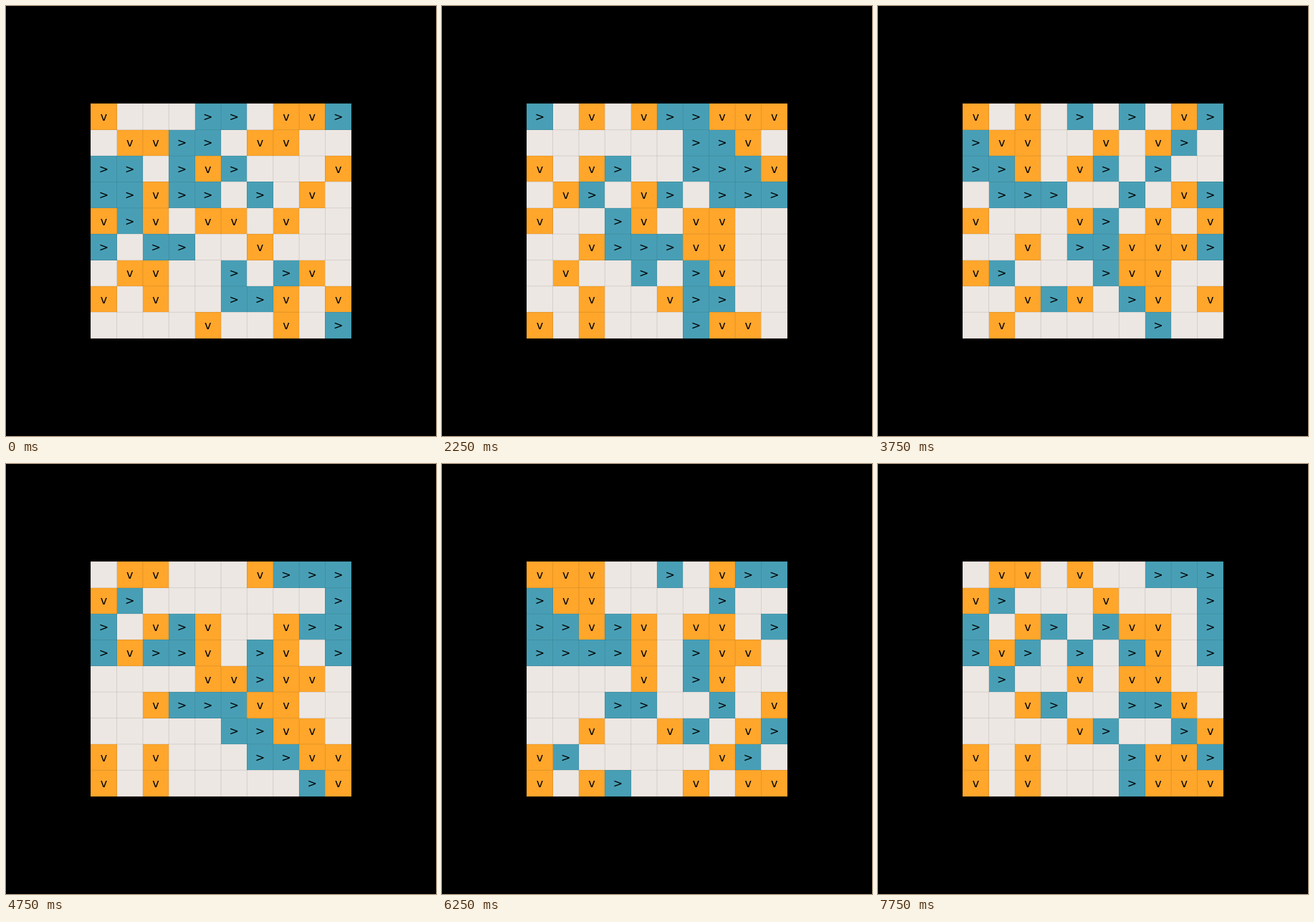
These frames come from a looping animation (600 px wide and 600 px high, 8000 ms). An HTML page:

```html
<!DOCTYPE html>
<html lang="en">
<head>
<meta charset="utf-8">
<title>Drifting herds</title>
<style>
  html, body { margin: 0; width: 100%; height: 100%; overflow: hidden; background: #000; }
  svg { display: block; width: 100%; height: 100%; }
  text { font: 16px "DejaVu Sans", sans-serif; text-anchor: middle; fill: #000; }
</style>
</head>
<body>
<svg id="stage" viewBox="0 0 600 600"></svg>
<script>
const START = [
  "v...>>.vv>",
  ".vv>>.vv..",
  ">>.>v>...v",
  ">>v>>.>.v.",
  "v>v.vv.v..",
  ">.>>..v...",
  ".vv..>.>v.",
  "v.v..>>v.v",
  "....v..v.>"
].map(row => [...row]);

const ROWS = START.length, COLS = START[0].length;
const CELL = 400 / 11;
const LEFT = 300 - COLS * CELL / 2, TOP = 300 - ROWS * CELL / 2;
const LOOP = 8000, STEP = 250, STEPS = 30;
const COLORS = { ".": "#ede7e3", ">": "#489fb5", "v": "#ffa62b" };

const stage = document.getElementById("stage");

function add(tag, attrs) {
  const el = document.createElementNS("http://www.w3.org/2000/svg", tag);
  for (const name in attrs) el.setAttribute(name, attrs[name]);
  return stage.appendChild(el);
}

// Every member of one herd moves at once if the cell ahead is free; edges wrap.
function move(grid, herd, dx, dy) {
  const next = grid.map(row => [...row]);
  grid.forEach((row, y) => row.forEach((kind, x) => {
    const nx = (x + dx) % COLS, ny = (y + dy) % ROWS;
    if (kind === herd && grid[ny][nx] === ".") {
      next[y][x] = ".";
      next[ny][nx] = herd;
    }
  }));
  return next;
}

const states = [START];
for (let i = 0; i < STEPS; i++) {
  states.push(move(move(states[i], ">", 1, 0), "v", 0, 1));
}

const colX = c => LEFT + c * CELL;
const rowY = r => TOP + r * CELL;

const tiles = START.map((row, r) => row.map((_, c) => {
  const x = Math.round(colX(c)), y = Math.round(rowY(r));
  return add("rect", {
    x, y,
    width: Math.round(colX(c + 1)) - x,
    height: Math.round(rowY(r + 1)) - y
  });
}));

let grid = "";
for (let c = 0; c <= COLS; c++) grid += `M${colX(c)} ${TOP}V${rowY(ROWS)}`;
for (let r = 0; r <= ROWS; r++) grid += `M${LEFT} ${rowY(r)}H${colX(COLS)}`;
add("path", { d: grid, stroke: "#000", "stroke-opacity": 0.1, fill: "none" });

const labels = START.map((row, r) => row.map((_, c) =>
  add("text", { x: colX(c + 0.5), y: rowY(r + 0.5) + 5.5 })));

let shown = -1;
function draw(time) {
  const step = Math.max(0, Math.floor(time % LOOP / STEP) - 1);
  if (step === shown) return;
  shown = step;
  states[step].forEach((row, r) => row.forEach((kind, c) => {
    tiles[r][c].setAttribute("fill", COLORS[kind]);
    labels[r][c].textContent = kind === "." ? "" : kind;
  }));
}

const begin = performance.now();
function tick() {
  draw(performance.now() - begin);
  requestAnimationFrame(tick);
}
tick();
</script>
</body>
</html>
```
